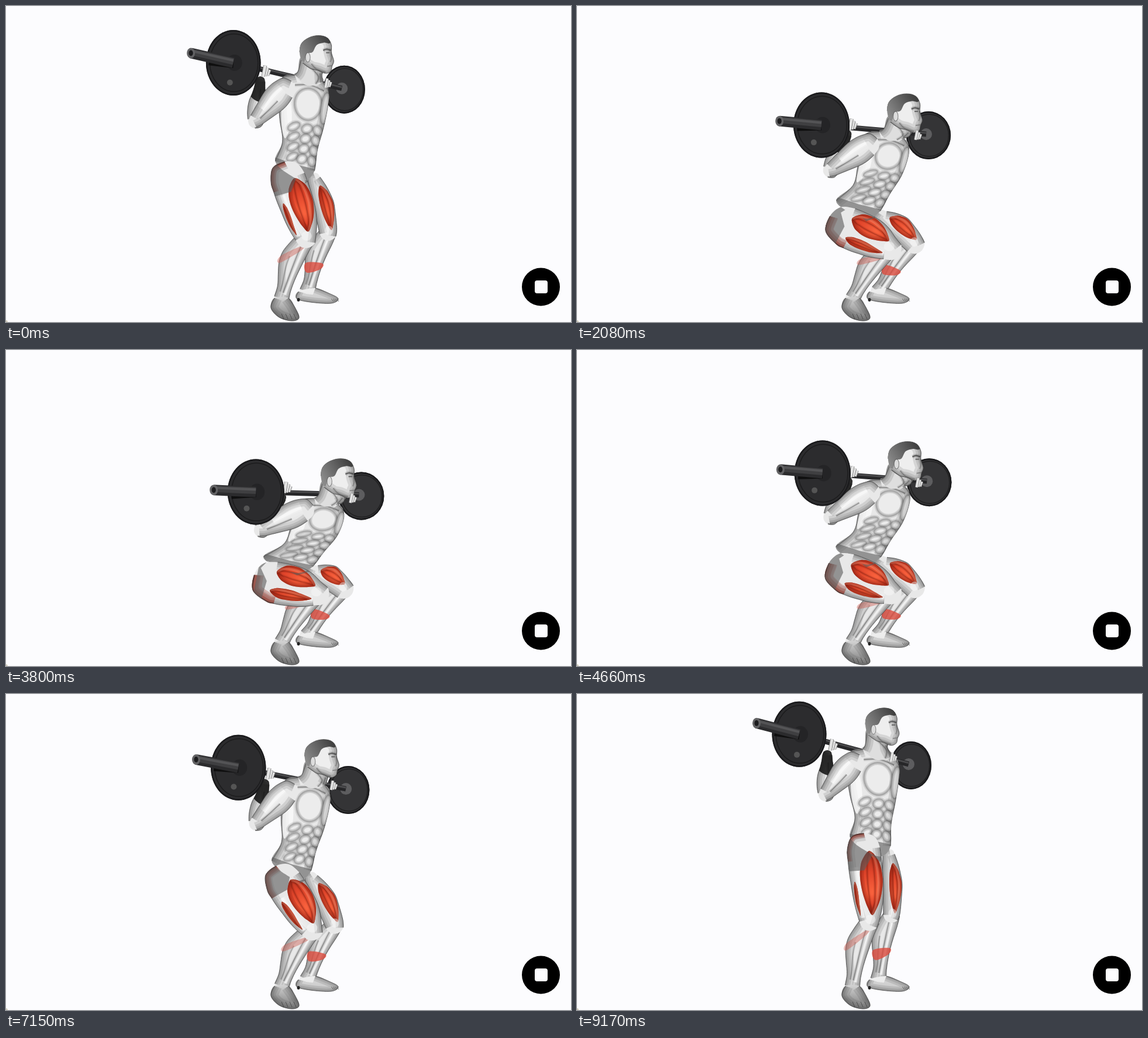
These frames come from a looping animation (966 by 540 pixels, 9190 ms). An HTML page with a canvas:

```html
<!DOCTYPE html>
<html lang="en">
<head>
<meta charset="utf-8">
<title>Barbell squat</title>
<style>
html, body { margin: 0; width: 100%; height: 100%; overflow: hidden; background: #fcfcfe; }
canvas { display: block; width: 100vw; height: 100vh; }
</style>
</head>
<body>
<canvas id="stage" width="966" height="540"></canvas>
<script>
const ctx = document.getElementById('stage').getContext('2d');
const LOOP = 9190, PAPER = '#fcfcfe', SKIN = '#e8e8e8';

// Height of the bar over time: [ms, pixels below the top]
const KEYS = [[0, 41], [2080, 147], [3330, 193], [4660, 154], [6620, 93],
  [7150, 70], [7620, 37], [8450, 8], [9190, 13]];

// Joints while standing, half way down and at the bottom
const JOINTS = {
  barEnd: [[307, 50], [334, 146], [356, 243]],
  disc: [[380, 69], [406, 157], [428, 246]],
  hub: [[567, 120], [588, 185], [604, 250]],
  head: [[492, 24], [518, 107], [538, 189]],
  backShoulder: [[464, 104], [481, 178], [502, 262]],
  frontShoulder: [[552, 112], [560, 189], [579, 272]],
  backHip: [[467, 245], [449, 305], [440, 355]],
  frontHip: [[536, 260], [518, 323], [525, 372]],
  shoulder: [[470, 119], [486, 196], [508, 277]],
  elbow: [[426, 170], [431, 245], [438, 309]],
  wrist: [[428, 104], [450, 180], [472, 255]],
  hip: [[492, 264], [469, 344], [455, 395]],
  knee: [[500, 388], [530, 408], [531, 416]],
  farHip: [[534, 274], [521, 334], [528, 380]],
  farKnee: [[538, 377], [570, 400], [576, 407]]
};
const ANKLE = [471, 501], FAR_ANKLE = [515, 488];

const mix = (a, b, k) => a + (b - a) * k;
const mixPt = (a, b, k) => [mix(a[0], b[0], k), mix(a[1], b[1], k)];
const span = (n, fn) => Array.from({ length: n + 1 }, (_, i) => fn(i / n));
const clamp = v => Math.min(1, Math.max(0, v));

function depthAt(t) {
  let i = 0;
  while (i < KEYS.length - 2 && t >= KEYS[i + 1][0]) i++;
  const slope = j => {
    const a = KEYS[Math.max(j - 1, 0)], b = KEYS[Math.min(j + 1, KEYS.length - 1)];
    return (b[1] - a[1]) / (b[0] - a[0]);
  };
  const [t0, y0] = KEYS[i], [t1, y1] = KEYS[i + 1], h = t1 - t0, k = (t - t0) / h;
  return mix(y0, y1, k * k * (3 - 2 * k)) + h * k * (1 - k) * ((1 - k) * slope(i) - k * slope(i + 1));
}

// Parabola through the three joint positions
const bend = ([a, b, c], k) => [0, 1].map(i =>
  a[i] * (1 - k) * (1 - 2 * k) + b[i] * 4 * k * (1 - k) + c[i] * k * (2 * k - 1));

// Smooth line through all points
function curve(p, closed = true) {
  const path = new Path2D(), n = p.length;
  const at = i => closed ? p[(i + n) % n] : p[Math.min(Math.max(i, 0), n - 1)];
  path.moveTo(...p[0]);
  for (let i = 0; i < (closed ? n : n - 1); i++) {
    const [a, b, c, d] = [at(i - 1), at(i), at(i + 1), at(i + 2)];
    path.bezierCurveTo(b[0] + (c[0] - a[0]) / 6, b[1] + (c[1] - a[1]) / 6,
      c[0] - (d[0] - b[0]) / 6, c[1] - (d[1] - b[1]) / 6, ...c);
  }
  if (closed) path.closePath();
  return path;
}

function line(path, color, width) {
  ctx.strokeStyle = color;
  ctx.lineWidth = width;
  ctx.stroke(path);
}

function fill(path, color) {
  ctx.fillStyle = color;
  ctx.fill(path);
}

function inside(path, draw) {
  ctx.save();
  ctx.clip(path);
  draw();
  ctx.restore();
}

const gray = (v, a) => `rgba(${v},${v},${v},${a})`;

function soft(p, v, width, alpha = .4) {
  const path = curve(p, false);
  line(path, gray(v, alpha * .25), width * 4);
  line(path, gray(v, alpha * .4), width * 2);
  line(path, gray(v, alpha), width);
}

function oval(x, y, rx, ry, color) {
  const path = new Path2D();
  path.ellipse(x, y, rx, ry, 0, 0, 7);
  fill(path, color);
  return path;
}

function rod(a, b, width, color) {
  line(curve([a, b], false), color, width);
}

// Skin that darkens softly towards the given edges
function flesh(points, edges, color = SKIN) {
  const path = curve(points), rims = edges.map(e => curve(e, false));
  fill(path, color);
  inside(path, () => rims.forEach(r => [26, 17, 10, 5].forEach(w => line(r, gray(50, .13), w))));
  rims.forEach(r => line(r, gray(45, .7), 1));
  return path;
}

// Bone from a to b; widths run along it. at(t, s): s is -1 on the back edge, 1 on the front
function limb(a, b, back, front, grow = 1) {
  const len = Math.hypot(b[0] - a[0], b[1] - a[1]);
  const ux = (b[0] - a[0]) / len, uy = (b[1] - a[1]) / len;
  const width = (list, t) => {
    const x = clamp(t) * (list.length - 1), i = Math.min(Math.floor(x), list.length - 2);
    return mix(list[i], list[i + 1], x - i) * grow;
  };
  const at = (t, s) => {
    const w = s * width(s < 0 ? back : front, t);
    return [a[0] + ux * len * t + uy * w, a[1] + uy * len * t - ux * w];
  };
  const cap = (end, s) => {
    const reach = width(s < 0 ? back : front, end) * Math.sqrt(1 - s * s) / len;
    return at(end ? 1 + reach : -reach, s);
  };
  const frontEdge = [...span(6, t => at(t, 1)), cap(1, .7)];
  const backEdge = [cap(0, 0), cap(0, -.7), ...span(6, t => at(t, -1))];
  const outline = [...frontEdge, cap(1, 0), cap(1, -.7), ...[...backEdge].reverse(), cap(0, .7)];
  return { at, frontEdge, backEdge, outline, draw: () => flesh(outline, [frontEdge, backEdge]) };
}

// Red spindle lying on a limb between t0 and t1, s0 and s1
function muscle(bone, t0, t1, s0, s1) {
  const mid = (s0 + s1) / 2, half = (s1 - s0) / 2;
  const run = side => span(8, t => bone.at(mix(t0, t1, t), mid + side * half * Math.sin(Math.PI * t ** .85) ** .6));
  const path = curve([...run(-1), ...run(1).reverse().slice(1, -1)]);
  const glow = ctx.createRadialGradient(...bone.at(mix(t0, t1, .65), mid), 3, ...bone.at((t0 + t1) / 2, mid), 52);
  glow.addColorStop(0, '#f8603c');
  glow.addColorStop(.5, '#e0442a');
  glow.addColorStop(1, '#a8301e');
  fill(path, glow);
  inside(path, () => {
    [14, 8, 4].forEach(w => line(path, 'rgba(110,24,14,.2)', w));
    [-.35, .3].forEach(side => {
      const seam = curve(run(side), false);
      line(seam, 'rgba(110,20,10,.16)', 5);
      line(seam, 'rgba(110,20,10,.4)', 1.4);
    });
    line(curve(run(.62), false), 'rgba(255,165,135,.3)', 4);
  });
}

function leg(j, name, k) {
  const far = name === 'far';
  const hip = far ? j.farHip : j.hip, knee = far ? j.farKnee : j.knee;
  const bent = Math.sin(clamp(k) * Math.PI / 2);
  const shin = far
    ? limb(knee, FAR_ANKLE, [14, 22, 26, 19, 12, 13], [14, 13, 10, 9, 10, 13])
    : limb(knee, ANKLE, [15, 24, 30, 24, 15, 13], [17, 13, 11, 9, 9, 12]);
  const thigh = far
    ? limb(hip, knee, [11, 13, 13, 14], [9, 17, 20, 18, 14], 1 + .3 * bent)
    : limb(hip, knee, [30, 30, 27, 24, 17], [26, 28, 28, 26, 17], 1 + .25 * bent);

  shin.draw();
  soft(span(4, t => shin.at(.12 + .8 * t, .25)), 255, 3, .6);
  soft(span(4, t => shin.at(.1 + .8 * t, -.1)), 70, 1.3);
  soft(span(4, t => shin.at(.35 + .55 * t, -.5)), 80, 1);
  const band = far ? [[.5, .9], [.6, .9], [.72, -.8], [.58, -.95]] : [[.12, .1], [.2, .1], [.5, -.95], [.4, -.95]];
  fill(curve(band.map(p => shin.at(...p))), far ? 'rgba(220,75,62,.8)' : 'rgba(205,95,85,.45)');
  drawFoot(far);

  const path = thigh.draw();
  if (!far) inside(path, () => {
    const rump = curve(thigh.backEdge.slice(0, 4), false);
    [30, 20, 10].forEach(w => line(rump, 'rgba(150,40,28,.28)', w * (.5 + .6 * clamp(k))));
    line(rump, gray(40, .5), 3);
    soft(span(4, t => thigh.at(.25 + .7 * t, -.55)), 255, 5, .5);
  });
  if (far) muscle(thigh, .15, .98, -.15, .97);
  else {
    muscle(thigh, .45 - .45 * k, .92, -.88 + .15 * k, -.62 + .42 * k);
    muscle(thigh, .04, .92, -.4 + .42 * k, .97);
  }
  oval(...thigh.at(.98, .1), far ? 7 : 9, 8, gray(250, .45));
  return { thigh, path };
}

function drawFoot(far) {
  const heel = far ? [500, 488] : [459, 499], toe = far ? [568, 500] : [501, 533];
  const p = far
    ? [heel, [497, 500], [520, 506], [556, 508], toe, [550, 490], [529, 482]]
    : [heel, [453, 516], [467, 532], [488, 538], toe, [494, 515], [483, 499]];
  const tone = ctx.createLinearGradient(0, heel[1], 0, heel[1] + 24);
  tone.addColorStop(0, far ? '#ededed' : '#d0d0d0');
  tone.addColorStop(1, far ? '#dedede' : '#9a9a9a');
  flesh(p, [p], tone);
  for (let i = 0; i < 4; i++) {
    const x = far ? 556 + i * 3 : 471 + i * 7, y = far ? 500 : 526;
    rod([x, y], [x + 4, y + (far ? 5 : 9)], 1, gray(45, .6));
  }
  if (far) oval(500, 502, 2.5, 3, '#222');
}

// Torso is a bent sheet between shoulders and hips: u from back to front, v downwards
function sheet(j, k) {
  return (u, v) => {
    const p = mixPt(mixPt(j.backShoulder, j.frontShoulder, u), mixPt(j.backHip, j.frontHip, u), v);
    return [p[0] + 14 * k * Math.sin(Math.PI * clamp(v)), p[1]];
  };
}

function trunk(at) {
  const p = [[.28, -.08], [0, 0], [-.02, .3], [.02, .5], [.12, .75], [0, 1], [.4, 1.12], [.8, 1.14],
    [1, 1], [.96, .75], [1, .5], [1.02, .25], [1, .08], [.85, -.03]].map(q => at(...q));
  const path = flesh(p, [p.slice(0, 6), p.slice(8)]);
  const pad = (u, v, ru, rv, slant = 0) => {
    const ring = span(9, a => [Math.cos(a * 6.283), Math.sin(a * 6.283)]).slice(1)
      .map(([x, y]) => at(u + x * ru, v + y * rv + x * slant));
    const shape = curve(ring);
    line(shape, gray(60, .13), 7);
    line(shape, gray(60, .3), 2.5);
    fill(shape, gray(240, .55));
    inside(shape, () => [8, 4].forEach(w => line(shape, gray(80, .14), w)));
  };
  inside(path, () => {
    fill(curve([at(.06, .2), at(.05, .5), at(.17, .7), at(.28, .5), at(.22, .25)]), gray(252, .8));
    for (let i = 0; i < 4; i++) {
      const v = .54 + .12 * i;
      pad(.34 + .02 * i, v, .13, .05, -.03);
      pad(.64, v, .12, .056, -.01);
      pad(.88, v, .1, .056, .01);
    }
    pad(.6, .25, .29, .19);
    pad(.97, .27, .09, .18);
    soft([at(.3, .04), at(.6, .02), at(.9, .07)], 60, 1.6);
  });
  return path;
}

function shorts(at, { thigh, path }, torsoPath, k) {
  const drop = .3 - .42 * k;
  const cloth = new Path2D();
  [at(-.1, .95), at(.5, .98), at(1.05, .98), at(1, 1.08), at(.8, 1.18), thigh.at(drop - .1, .9),
    thigh.at(drop - .2, .45), thigh.at(drop, -.1), thigh.at(drop, -1.1), thigh.at(-.3, -1.1)]
    .forEach(q => cloth.lineTo(...q));
  const body = new Path2D(path);
  body.addPath(torsoPath);
  inside(body, () => fill(cloth, gray(92, .6)));
}

function head(at, [x, y], k) {
  const size = 1 + .05 * k;
  const place = (px, py) => [x + px * size, y + py * size];
  const left = at(.28, -.08), right = at(.85, -.03);
  const nape = [place(5, 36), mixPt(place(7, 50), left, .6), left];
  const throat = [right, place(39, 68), place(40, 54)];
  flesh([...nape, at(.55, .03), ...throat], [nape, throat], '#dedede');
  soft([place(18, 52), mixPt(place(26, 60), right, .5), at(.72, 0)], 70, 1.5);
  soft([place(36, 64), at(.82, -.02)], 70, 1.3);

  ctx.save();
  ctx.translate(x, y);
  ctx.scale(size, size);
  const face = [[1, 28], [4, 14], [16, 4], [33, 0], [48, 4], [55, 16], [55, 29], [59, 43],
    [56, 52], [54, 60], [45, 64], [32, 59], [20, 56], [6, 46]];
  const skull = flesh(face, [face], '#eee');
  inside(skull, () => {
    const tone = ctx.createLinearGradient(0, 28, 48, 0);
    tone.addColorStop(0, '#8a8a8a');
    tone.addColorStop(1, '#3c3c3c');
    fill(curve([[-4, 30], [0, 0], [33, -6], [54, 4], [52, 13], [42, 12], [30, 16], [23, 28], [13, 31], [9, 44], [0, 42]]), tone);
  });
  line(oval(15, 37, 4, 8, '#dcdcdc'), gray(60, .6), 1);
  soft([[41, 25], [47, 23], [54, 25]], 40, 1.5, .6);
  rod([46, 29], [52, 29], 2, '#666');
  soft([[54, 28], [55, 38], [53, 45]], 80, 1);
  rod([48, 52], [56, 51], 1.3, '#777');
  soft([[21, 48], [30, 57], [45, 62]], 80, 1.4);
  ctx.restore();
}

function arm(j) {
  const lower = limb(j.elbow, j.wrist, [14, 17, 15, 10, 8], [14, 17, 15, 10, 8]);
  const upper = limb(j.shoulder, j.elbow, [20, 23, 20, 16, 12], [20, 23, 20, 16, 12]);
  const path = lower.draw();
  soft(span(4, t => lower.at(.1 + .7 * t, -.2)), 70, 1.4);
  inside(path, () => {
    fill(curve([lower.at(.62, 1.2), lower.at(.5, -1.2), lower.at(1.3, -1.4), lower.at(1.3, 1.4)]), gray(16, .85));
  });
  upper.draw();
  soft(span(4, t => upper.at(t * .7, -.25)), 255, 5, .5);
  soft(span(4, t => upper.at(.3 + .6 * t, .25)), 70, 1.4);
}

function fingers([x, y], size) {
  for (let i = 2; i >= 0; i--) {
    const a = [x + (i * 4 - 6) * size, y + (8 - i) * size];
    const b = [x + (i * 4 - 2) * size, y - (13 - i * 4) * size];
    rod(a, b, 7 * size, '#777');
    rod(a, b, 5.2 * size, '#e4e4e4');
  }
}

function plate([x, y], rx, ry, color) {
  const rim = oval(x, y, rx, ry, color);
  inside(rim, () => line(rim, '#1a1a1c', 5));
  const ring = new Path2D();
  ring.ellipse(x + 1, y, rx * .88, ry * .88, 0, 0, 7);
  line(ring, gray(16, .55), 1.5);
}

function sleeve(end, hub) {
  const drop = (q, d) => [q[0], q[1] + d];
  rod(drop(mixPt(end, hub, .42), 9), drop(hub, 4), 10, gray(8, .8));
  rod(end, hub, 18, '#2b2b2d');
  rod(drop(end, -2), drop(hub, -2), 11, '#3f3f41');
  rod(drop(end, -4), drop(hub, -4), 4, '#545456');
  oval(...end, 7, 9, '#626264');
  oval(...end, 3.6, 5, '#1c1c1e');
}

function button() {
  oval(914.5, 480, 32.5, 32.5, '#000');
  ctx.fillStyle = PAPER;
  ctx.beginPath();
  ctx.roundRect(904, 469, 22, 22, 4);
  ctx.fill();
}

function draw(t) {
  const k = (depthAt(t) - 13) / 176, j = {};
  for (const name in JOINTS) j[name] = bend(JOINTS[name], k);
  const { disc, hub } = j, at = sheet(j, k);

  ctx.fillStyle = PAPER;
  ctx.fillRect(0, 0, 966, 540);
  oval(0, 540, 3, 3, '#d4d0c0');
  plate([hub[0] + 4, hub[1] + 2], 35 + 4 * k, 41, '#343436');
  oval(...hub, 10, 10, '#5d5d5f');
  rod(disc, hub, 9, '#262628');
  rod([disc[0], disc[1] - 2], [hub[0], hub[1] - 2], 3, '#4a4a4c');

  leg(j, 'far', k);
  const torsoPath = trunk(at);
  shorts(at, leg(j, 'near', k), torsoPath, k);
  // the quadriceps stays visible over the cloth
  head(at, j.head, k);
  fingers([hub[0] - 26 + 16 * k, hub[1] - 10 + 18 * k], .75);
  arm(j);
  fingers([j.wrist[0] + 10, j.wrist[1] - 15], .9);

  plate(disc, 46.5 + 2 * k, 56, '#2c2c2e');
  oval(disc[0] - 4 - 12 * k, disc[1] + 35 - 7 * k, 5, 5, '#555');
  oval(disc[0] + 2, disc[1], 13, 14, '#242426');
  sleeve(j.barEnd, disc);
  button();
}

ctx.lineJoin = 'round';
const start = performance.now();
function tick() {
  draw((performance.now() - start) % LOOP);
  requestAnimationFrame(tick);
}
tick();
</script>
</body>
</html>
```
